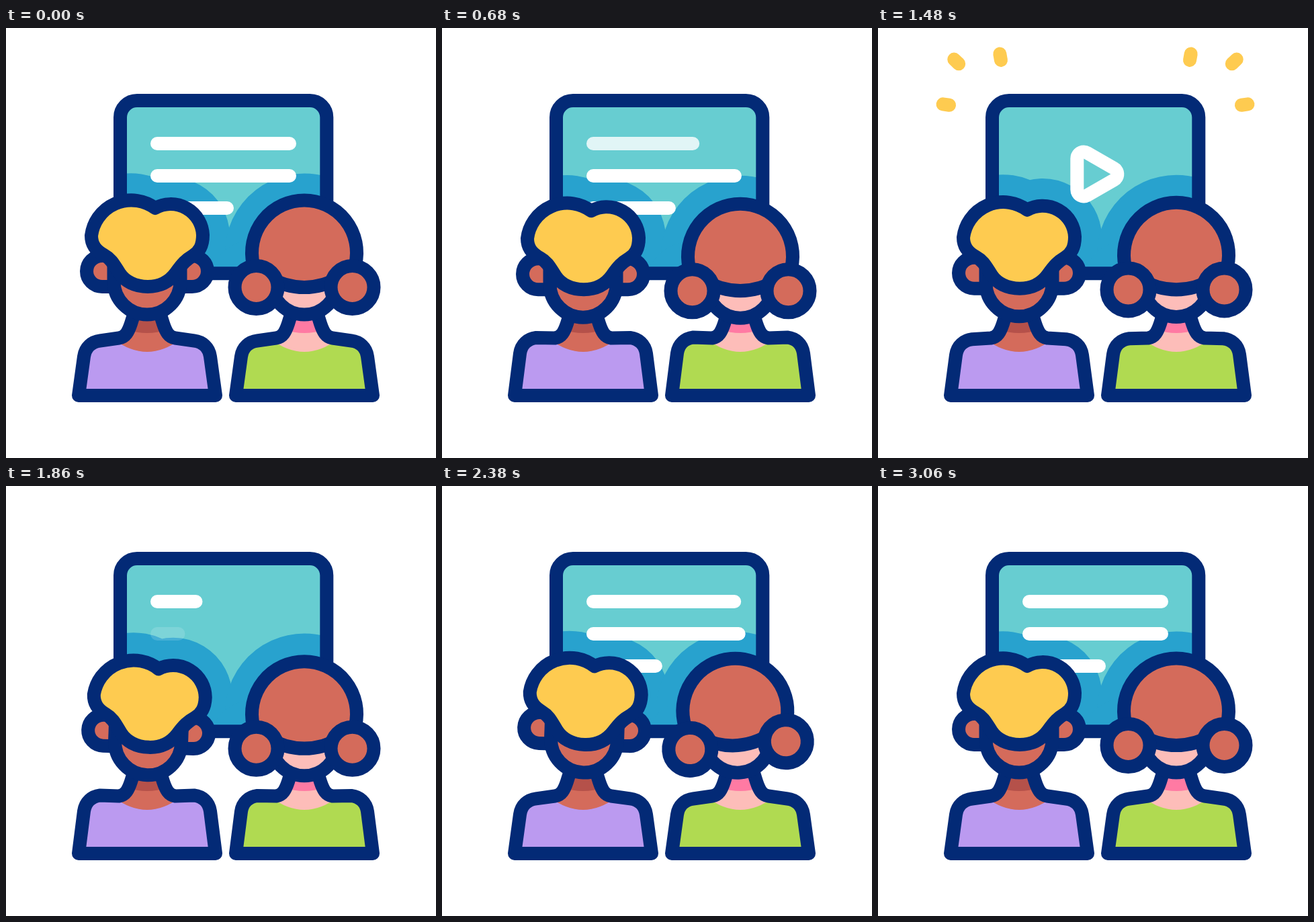
Recreate the animation shown at these times as an HTML page with a canvas. Size 640 by 640 pixels, loop 3100 ms.

```html
<!DOCTYPE html>
<html lang="en">
<head>
<meta charset="utf-8">
<title>Video lesson</title>
<style>
html, body { margin: 0; width: 100%; height: 100%; overflow: hidden; background: #fff; }
canvas { display: block; }
</style>
</head>
<body>
<canvas id="stage" width="640" height="640"></canvas>
<script>
const ctx = document.getElementById('stage').getContext('2d');
const LOOP = 3100;
const NAVY = '#032a76', TEAL = '#67cdd1', BLUE = '#28a2ce', WHITE = '#fff';
const YELLOW = '#fecb50', BROWN = '#d46b5b', PINK = '#fdbdb9';

// Smooth step from 0 to 1 between two times
function ease(t, from, to) {
  const u = Math.min(1, Math.max(0, (t - from) / (to - from)));
  return (1 - Math.cos(Math.PI * u)) / 2;
}

const breath = t => ease(t, 100, 700) - .7 * ease(t, 700, 1220)
  + .7 * ease(t, 1220, 1740) - ease(t, 1740, 2350);
const nod = t => 3.6 * (ease(t, 1600, 2120) - ease(t, 2120, 2640));
const sway = t => 4.9 * (2 * ease(t, 2350, 2700) - ease(t, 1940, 2350) - ease(t, 2700, 3040));

function fill(path, color) {
  ctx.fillStyle = color;
  ctx.fill(path);
}

function stroke(path, color = NAVY, width = 20) {
  ctx.strokeStyle = color;
  ctx.lineWidth = width;
  ctx.stroke(path);
}

function segment(x0, y0, x1, y1, color) {
  const line = new Path2D();
  line.moveTo(x0, y0);
  line.lineTo(x1, y1);
  stroke(line, color);
}

// A path together with its reflection in x = 0
function mirrored(d) {
  const half = new Path2D(d), path = new Path2D(half);
  path.addPath(half, new DOMMatrix().scale(-1, 1));
  return path;
}

function disc(x, y, r) {
  const path = new Path2D();
  path.arc(x, y, r, 0, 2 * Math.PI);
  return path;
}

// Parts of a person are placed around x = 0
const face = new Path2D('M-49.5 345V377A49.5 49.5 0 0 0 49.5 377V345Z');
const ears = mirrored('M-49 385H-67A23 23 0 0 1 -67 339H-49Z');
const quiff = new Path2D('M12 268A60 60 0 0 0 -83 309C-83 324 -75 332 -64 338S-49 353 -41 365' +
  'S-18 385 1 385S33 378 43 364S58 345 68 339S83 324 83 308A48 48 0 0 0 12 268Z');
const cap = new Path2D('M-76 352A78 78 0 1 1 76 352L56 370Q0 402 -56 370Z');
const collar = new Path2D('M-50 463Q0 501 50 463V400H-50Z');
const chinShade = new Path2D('M-30 400V449Q0 459 30 449V400Z');

const people = [
  {
    x: 210, drop: 4.2, lag: 100, tilt: nod, shirt: '#bb9af0', skin: BROWN, shade: '#b5514a',
    parts: [[ears, BROWN], [face, BROWN], [quiff, YELLOW]]
  },
  {
    x: 444, drop: 5.2, lag: 0, tilt: sway, shirt: '#b0da51', skin: PINK, shade: '#ff7aa3',
    parts: [[face, PINK], [cap, BROWN], ...[-71.5, 71.5].map(x => [disc(x, 386, 32), BROWN])]
  }
];

function drawHead(person, t, drop, drawPart) {
  ctx.save();
  ctx.translate(person.x, 428 + drop * breath(t));
  ctx.rotate(person.tilt(t) * Math.PI / 180);
  ctx.translate(0, -428);
  for (const [path, color] of person.parts) drawPart(path, color);
  ctx.restore();
}

function drawBody(person, t) {
  const lift = 5 * breath(t - person.lag), y = 465.5 - lift;
  const body = mirrored(`M0 547H-102L-94 ${489 - lift}C-92 ${y + 9.5} -82 ${y + 1.5} -70 ${y}` +
    'L-42 461.5C-32 460 -28 452 -24 440L-19 424H0');
  ctx.save();
  ctx.translate(person.x, 0);
  ctx.save();
  ctx.clip(body);
  fill(body, person.shirt);
  fill(collar, person.skin);
  fill(chinShade, person.shade);
  ctx.restore();
  stroke(body);
  ctx.restore();
}

function drawText(t) {
  [197, 197, 104].forEach((width, row) => {
    const time = t - row * 150, y = 172 + row * 48;
    const away = Math.abs(time - 1355); // shrinks, then grows back the same way
    const grow = .16 + .94 * ease(away, 385, 880) - .1 * ease(away, 880, 1255);
    ctx.globalAlpha = 1 - ease(time, 605, 865) + ease(time, 1685, 1790);
    segment(225, y, 225 + width * grow, y, WHITE);
  });
  ctx.globalAlpha = 1;
}

function drawPlay(t) {
  const away = Math.abs(t - 1375), a = Math.PI / 3;
  const scale = 1 + .1 * ease(away, 110, 190) - .38 * ease(away, 190, 430);
  const icon = new Path2D();
  icon.arc(326.3 - 20 * scale, 217.5 - 23 * scale, 10 * scale, Math.PI, -a);
  icon.arc(326.3 + 20 * scale, 217.5, 10 * scale, -a, a);
  icon.arc(326.3 - 20 * scale, 217.5 + 23 * scale, 10 * scale, a, Math.PI);
  icon.closePath();
  ctx.globalAlpha = 1 - ease(away, 265, 425);
  stroke(icon, WHITE);
  ctx.globalAlpha = 1;
}

// Three dashes fan out from each upper corner of the board
function drawSparks(t) {
  const head = 28 * ease(t, 1200, 1590), tail = 28 * ease(t, 1285, 1690);
  if (head - tail < .1) return;
  for (const side of [-1, 1]) {
    [85, 111, 96].forEach((radius, i) => {
      const angle = (80 - 36 * i) * Math.PI / 180;
      const x = r => 323.5 + side * (126.5 + r * Math.cos(angle));
      const y = r => 127.5 - r * Math.sin(angle);
      const from = radius + tail - 17.5, to = radius + head - 17.5;
      segment(x(from), y(from), x(to), y(to), YELLOW);
    });
  }
}

const board = new Path2D();
board.roundRect(170, 108, 307.3, 257.3, 25);

function drawBoard(t) {
  fill(board, TEAL);
  ctx.save();
  ctx.clip(board);
  for (const p of people) {
    drawHead(p, t, p.drop * .65, path => {
      fill(path, BLUE);
      stroke(path, BLUE, 80);
    });
  }
  ctx.restore();
  drawText(t);
  drawPlay(t);
  stroke(board);
}

function frame() {
  const t = performance.now() % LOOP;
  ctx.fillStyle = WHITE;
  ctx.fillRect(0, 0, 640, 640);
  ctx.lineCap = ctx.lineJoin = 'round';
  drawBoard(t);
  drawSparks(t);
  for (const p of people) {
    drawBody(p, t);
    drawHead(p, t, p.drop, (path, color) => {
      fill(path, color);
      stroke(path);
    });
  }
  requestAnimationFrame(frame);
}
frame();
</script>
</body>
</html>
```
